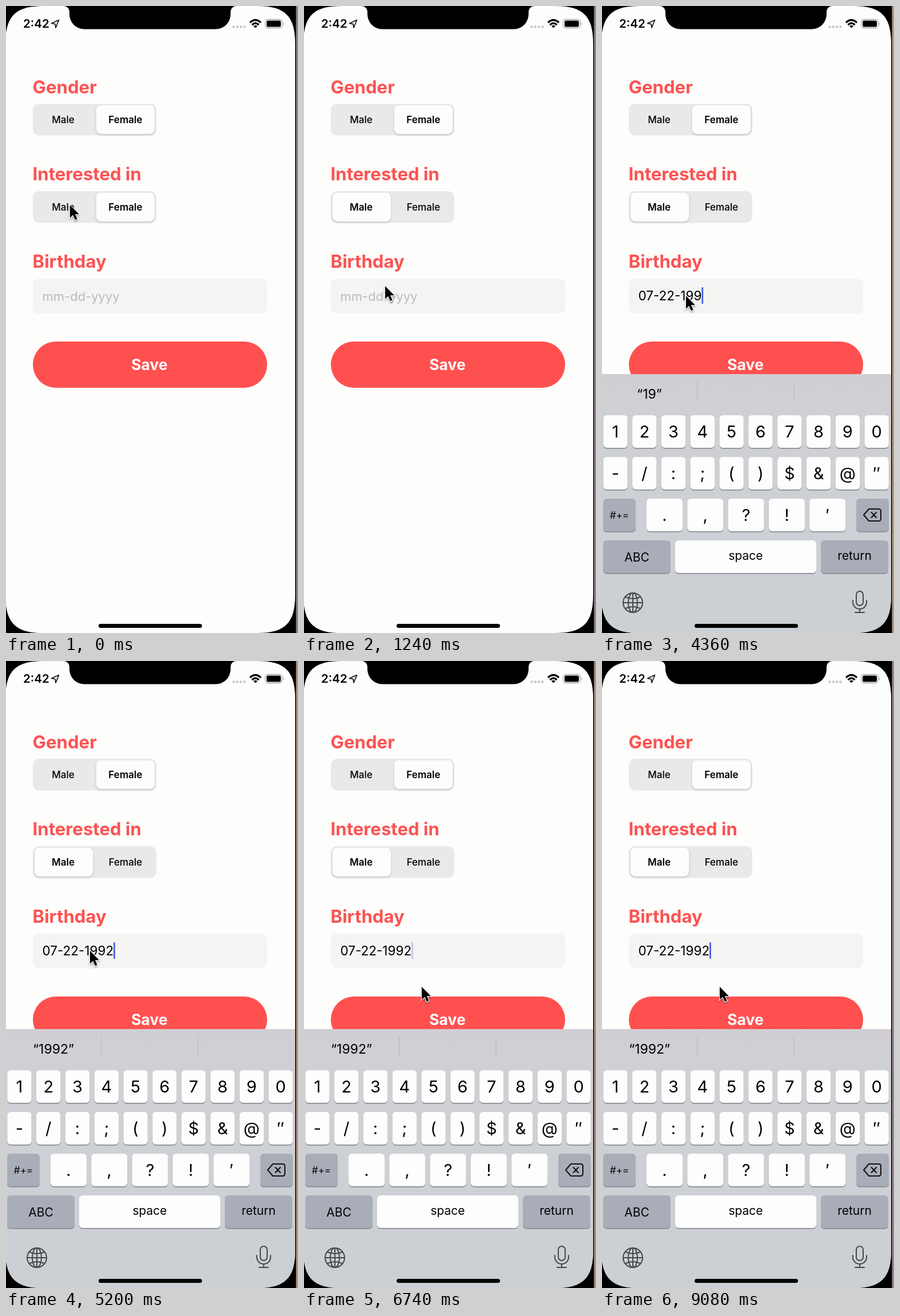
An HTML page for the animation above (9.18 s loop, 511 by 1097 pixels).

```html
<!DOCTYPE html>
<html lang="en">
<head>
<meta charset="utf-8">
<title>Profile form</title>
<style>
  html, body { margin: 0; width: 100%; height: 100%; overflow: hidden; background: #000; }
  svg { display: block; width: 100vw; height: 100vh; font-family: Inter, Roboto, sans-serif; }
  .mid { text-anchor: middle; }
  .title { font-size: 31.2px; font-weight: 700; fill: #fb5353; }
  .seg { font-size: 17.1px; font-weight: 500; text-anchor: middle; }
  .thumb { fill: #fdfdfb; stroke: #e0e0e3; filter: drop-shadow(0 2px 1.5px #0002); }
  .line { fill: none; stroke: #44474c; stroke-width: 2; stroke-linecap: round; stroke-linejoin: round; }
</style>
</head>
<body>
<svg viewBox="0 0 511 1097" preserveAspectRatio="none">
  <defs>
    <clipPath id="screen">
      <path d="M65 0H440C488.3 0 506 17.7 506 66V1031C506 1079.3 488.3 1097 440 1097H65C16.7 1097 -1 1079.3 -1 1031V66C-1 17.7 16.7 0 65 0Z"/>
    </clipPath>
    <linearGradient id="board" x2="0" y2="1">
      <stop offset="0" stop-color="#d0ced3"/>
      <stop offset=".16" stop-color="#cfd0d5"/>
      <stop offset="1" stop-color="#cbd0d4"/>
    </linearGradient>
  </defs>
  <rect width="508" height="1097"/>
  <rect id="desk" x="507.5" width="4" height="1097"/>

  <g clip-path="url(#screen)">
    <rect x="-1" width="507" height="1097" fill="#fdfdfb"/>
    <g class="title">
      <text x="46.500" y="153">Gender</text>
      <text x="46.500" y="305">Interested in</text>
      <text x="46.500" y="458">Birthday</text>
    </g>
    <g id="segments"></g>

    <rect x="47" y="477" width="410" height="61" rx="11" fill="#f4f4f2"/>
    <text id="hint" x="63.5" y="516" font-size="22" fill="#bbbabd">mm-dd-yyyy</text>
    <text id="value" x="63.5" y="515" font-size="22.5"></text>
    <rect id="caret" y="492" width="2.7" height="29" rx="1" fill="#3f60e6"/>

    <rect x="47" y="587" width="410" height="81" rx="40.5" fill="#ff5050"/>
    <text class="mid" x="251" y="637" font-size="26.5" font-weight="700" fill="#fff">Save</text>

    <g id="keyboard">
      <rect x="-1" y="644" width="507" height="453" fill="url(#board)"/>
      <path d="M166.5 657V691M336 657V691" stroke="#bcbac0" stroke-width="1.3"/>
      <text id="guess" class="mid" x="83" y="687" font-size="23"></text>
      <g id="keys" class="mid"></g>
      <path class="line" style="stroke:#111" d="M467 880H484Q488 880 488 884V897Q488 901 484 901H467L458 890.5ZM471.5 886L480 895M480 886L471.5 895"/>
      <g class="line">
        <circle cx="54" cy="1044" r="17"/>
        <ellipse cx="54" cy="1044" rx="8" ry="17"/>
        <path d="M54 1027V1061M37 1044H71M41 1034Q54 1040 67 1034M41 1054Q54 1048 67 1054"/>
        <rect x="445" y="1024" width="12" height="25" rx="6"/>
        <path d="M439 1040V1043A12 12 0 0 0 463 1043V1040M451 1055V1061M443 1061H459"/>
      </g>
    </g>

    <path d="M101 0A10 10 0 0 1 111 10V14A26 26 0 0 0 137 40.5H367A26 26 0 0 0 393 14V10A10 10 0 0 1 403 0Z"/>
    <text x="30" y="38" font-size="20.5" font-weight="600">2:42</text>
    <path d="M92.5 24.5L79.5 30.5L86 31.5L87 38Z" fill="none" stroke="#111" stroke-width="1.7" stroke-linejoin="round"/>
    <path d="M398.5 36.5H420" stroke="#c9c9cb" stroke-width="4.6" stroke-linecap="round" stroke-dasharray="0 6.3"/>
    <g fill="none" stroke="#000" stroke-width="3.2">
      <path d="M427 29Q436.5 20 446 29M430.5 33Q436.5 27 442.5 33"/>
      <path d="M433 35Q436.5 32.5 440 35L436.5 38.5Z" fill="#000" stroke="none"/>
    </g>
    <rect x="453.7" y="23.5" width="29.6" height="15" rx="4.5" fill="none" stroke="#a5a5a7" stroke-width="1.3"/>
    <rect x="456" y="25.5" width="25" height="11" rx="2.8"/>
    <path d="M485 28.5Q488 31 485 33.5Z" fill="#a5a5a7"/>
    <rect x="162" y="1081" width="181" height="7" rx="3.5"/>
  </g>

  <path id="pointer" d="M2 2V24.5L7.2 19.7L11 28.3L14.6 26.600L11 18.3H18Z" stroke="#fff" stroke-width="2.2" paint-order="stroke" style="filter:drop-shadow(0 2px 1.5px #0005)"/>
</svg>

<script>
const LOOP = 9180, DATE = "07-22-1992";
const $ = id => document.getElementById(id);
const clamp = v => Math.min(1, Math.max(0, v));
const mix = (a, b, k) => a + (b - a) * k;
const smooth = k => k * k * (3 - 2 * k);

// Segmented controls
const segment = (y, name) => `
  <rect x="47" y="${y}" width="216" height="55.5" rx="11" fill="#e9e9ea"/>
  <rect id="${name}Thumb" class="thumb" x="157.5" y="${y + 2}" width="103" height="51" rx="9"/>
  <g class="seg"><text id="${name}Male" x="100" y="${y + 34}">Male</text>
  <text id="${name}Female" x="209" y="${y + 34}">Female</text></g>`;
$("segments").innerHTML = segment(171, "gender") + segment(324, "interest");
$("genderFemale").style.fontWeight = 600;

// Keyboard keys
const key = (x, y, w, label, size = 29, fill = "#fdfdfd", drop = 39) => `
  <rect x="${x}" y="${y + 1.7}" width="${w}" height="57" rx="6" fill="#8b8e93"/>
  <rect x="${x}" y="${y}" width="${w}" height="57" rx="6" fill="${fill}"/>
  <text x="${x + w / 2}" y="${y + drop}" font-size="${size}">${label}</text>`;
const row = (labels, x, y, w, step) =>
  labels.map((label, i) => key(x + i * step, y, w, label)).join("");
const GREY = "#a9adb8";
$("keys").innerHTML =
  row([..."1234567890"], 2.3, 716, 42.3, 50.8) +
  row(["-", "/", ":", ";", "(", ")", "$", "&amp;", "@", "″"], 2.3, 789, 42.3, 50.8) +
  row([".", ",", "?", "!", "′"], 78, 862, 63, 71.3) +
  key(2, 862, 57, "#+=", 17, GREY, 35) +
  key(445, 862, 57, "", 17, GREY) +
  key(2, 935, 118, "ABC", 21, GREY, 37) +
  key(128, 935, 247, "space", 21, "#fdfdfd", 34) +
  key(383, 935, 118, "return", 21, GREY, 34);

// Rows of [time, ...values], eased between neighbours
const pointerPath = [[0, 110, 346], [560, 110, 346], [1160, 140, 488], [1300, 140, 488],
  [1600, 145, 505], [5500, 145, 505], [5860, 176, 531], [6300, 204, 568]];
const deskTones = [[0, 146, 128, 138], [3850, 146, 128, 138], [3950, 181, 148, 126],
  [5860, 176, 144, 128], [7860, 170, 140, 132], [9000, 150, 130, 142]];
function track(rows, t) {
  const i = rows.findIndex(r => r[0] > t);
  if (i < 0) return rows[rows.length - 1].slice(1);
  const a = rows[i - 1], b = rows[i], k = smooth((t - a[0]) / (b[0] - a[0]));
  return a.slice(1).map((v, j) => mix(v, b[j + 1], k));
}

function caretOpacity(t) {
  if (t < 3900) return 0;
  if (t < 4900) return 1;
  const d = (t - 5840 + 1040 * 9) % 1040;
  return d < 520 ? 1 : d < 840 ? clamp((720 - d) / 200) : (d - 840) / 200;
}

function draw(t) {
  const slide = smooth(clamp((t - 220) / 260)), male = slide > .5;
  $("interestThumb").setAttribute("x", mix(157.5, 49.5, slide));
  $("interestMale").style.fontWeight = male ? 600 : 500;
  $("interestFemale").style.fontWeight = male ? 500 : 600;

  const rise = 1 - (1 - clamp((t - 3880) / 200)) ** 3;
  $("keyboard").setAttribute("transform", `translate(0 ${453 * (1 - rise)})`);
  $("keyboard").style.display = rise ? "" : "none";

  const count = t < 4080 ? 0 : t < 4460 ? Math.min(9, 1 + Math.floor((t - 4080) / 34)) : 10;
  const known = count < 10 ? DATE.slice(0, Math.max(0, count - 1)) : DATE;
  const word = known.split("-").pop();
  $("value").textContent = DATE.slice(0, count);
  $("hint").style.display = count ? "none" : "";
  $("guess").textContent = word && `“${word}”`;
  $("caret").setAttribute("x", 63.5 + (count ? $("value").getComputedTextLength() : 0));
  $("caret").setAttribute("opacity", caretOpacity(t));

  $("pointer").setAttribute("transform", `translate(${track(pointerPath, t)})`);
  $("desk").setAttribute("fill", `rgb(${track(deskTones, t).map(Math.round)})`);
}

const start = performance.now();
function frame() {
  draw((performance.now() - start) % LOOP);
  requestAnimationFrame(frame);
}
frame();
</script>
</body>
</html>
```
